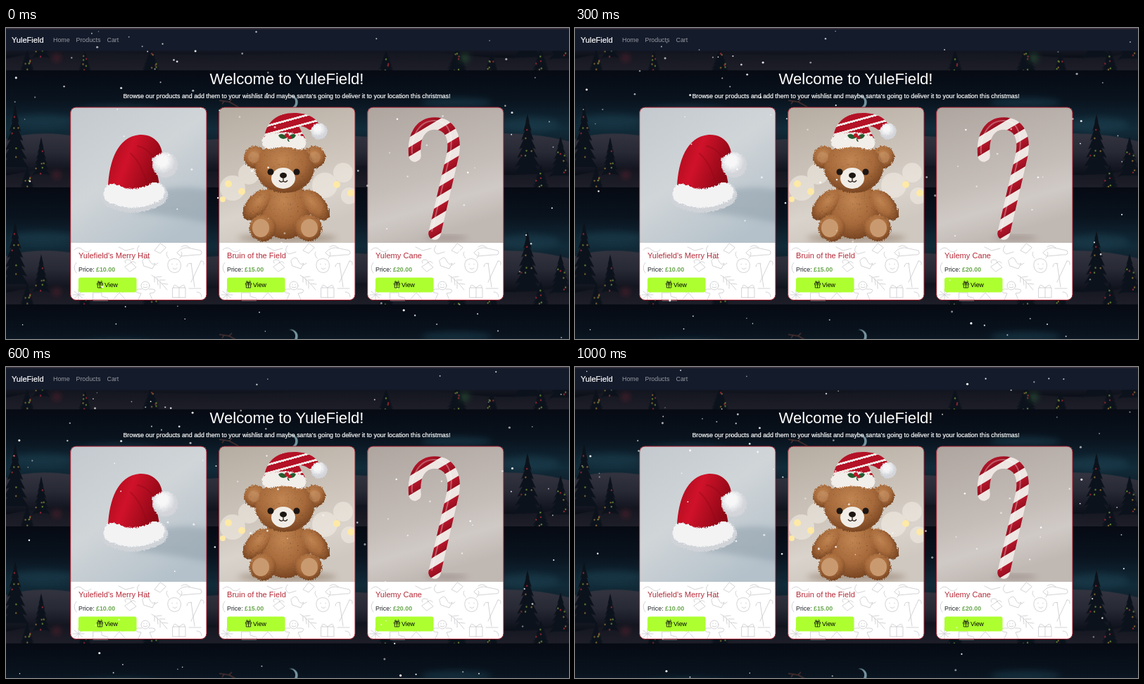
These frames come from a looping animation (800 px wide and 443 px high, 1100 ms). An HTML page with a canvas:

```html
<!DOCTYPE html>
<html lang="en">
<head>
<meta charset="utf-8">
<title>YuleField</title>
<style>
  html, body { margin: 0; width: 100%; height: 100%; overflow: hidden; background: #080d17; }
  svg, canvas { position: absolute; left: 0; top: 0; width: 800px; height: 443px; }
  text { font: 8.85px "Liberation Sans", Arial, sans-serif; fill: #212529; }
  .brand, .name { font-size: 11.1px; }
  .brand, .intro { fill: #fff; stroke: #fff; stroke-width: .2; }
  .head { font-size: 22.1px; fill: #fff; }
  .link { fill: #9699a0; }
  .name { fill: #b52b38; }
  .price { fill: #6aa84f; font-weight: bold; }
  .doodle { fill: none; stroke: #cfcfd2; stroke-width: .9; stroke-linecap: round; }
</style>
</head>
<body>
<svg viewBox="0 0 800 443">
  <defs>
    <linearGradient id="sky" x2="0" y2="1">
      <stop offset="0" stop-color="#060a13"/><stop offset=".25" stop-color="#09131e"/>
      <stop offset=".5" stop-color="#122b39"/><stop offset=".75" stop-color="#0b1420"/>
      <stop offset="1" stop-color="#090d17"/>
    </linearGradient>
    <linearGradient id="hill" x2="0" y2="1">
      <stop offset="0" stop-color="#33343f"/><stop offset=".45" stop-color="#272934"/>
      <stop offset="1" stop-color="#0a0e17"/>
    </linearGradient>
    <linearGradient id="drift" x2="0" y2="1">
      <stop offset="0" stop-color="#11141e"/><stop offset="1" stop-color="#1e1e28"/>
    </linearGradient>
    <linearGradient id="wall1" x2=".7" y2="1">
      <stop offset="0" stop-color="#c3c9ce"/><stop offset=".5" stop-color="#d0d5d8"/>
      <stop offset="1" stop-color="#b4c1ca"/>
    </linearGradient>
    <linearGradient id="wall2" x2=".3" y2="1">
      <stop offset="0" stop-color="#b5aca1"/><stop offset=".6" stop-color="#d0c8bf"/>
      <stop offset=".78" stop-color="#d9d3cc"/><stop offset="1" stop-color="#cfc8c0"/>
    </linearGradient>
    <linearGradient id="wall3" x2=".3" y2="1">
      <stop offset="0" stop-color="#aea59f"/><stop offset=".6" stop-color="#c5bdb8"/>
      <stop offset=".8" stop-color="#d0cac6"/><stop offset="1" stop-color="#c0b8b3"/>
    </linearGradient>
    <linearGradient id="red" x2="1" y2=".4">
      <stop offset="0" stop-color="#a20a19"/><stop offset=".45" stop-color="#d0122a"/>
      <stop offset="1" stop-color="#8d0715"/>
    </linearGradient>
    <radialGradient id="wool" cx=".4" cy=".35">
      <stop offset=".4" stop-color="#f7f7f8"/><stop offset="1" stop-color="#d3d5da"/>
    </radialGradient>
    <radialGradient id="fur" cx=".45" cy=".35" r=".65">
      <stop offset="0" stop-color="#c08552"/><stop offset=".6" stop-color="#a76a3b"/>
      <stop offset="1" stop-color="#784522"/>
    </radialGradient>
    <linearGradient id="candy" gradientUnits="userSpaceOnUse" x1="600" y1="140" x2="612" y2="160" spreadMethod="repeat">
      <stop offset=".48" stop-color="#eee6e2"/><stop offset=".52" stop-color="#b5162a"/>
      <stop offset=".96" stop-color="#980f20"/><stop offset="1" stop-color="#eee6e2"/>
    </linearGradient>
    <linearGradient id="stripes" gradientUnits="userSpaceOnUse" x1="390" y1="124" x2="393" y2="135" spreadMethod="repeat">
      <stop offset=".72" stop-color="#b41226"/><stop offset=".76" stop-color="#f0e6e4"/>
      <stop offset="1" stop-color="#f0e6e4"/>
    </linearGradient>
    <filter id="soft" x="-50%" y="-50%" width="200%" height="200%"><feGaussianBlur stdDeviation="4"/></filter>
    <filter id="fuzz" filterUnits="userSpaceOnUse" x="92" y="113" width="405" height="193">
      <feTurbulence baseFrequency=".3" numOctaves="2" seed="4"/>
      <feDisplacementMap in="SourceGraphic" scale="4" xChannelSelector="R" yChannelSelector="G"/>
    </filter>
    <filter id="pelt" filterUnits="userSpaceOnUse" x="303" y="113" width="194" height="193">
      <feTurbulence baseFrequency=".3" numOctaves="2" seed="4" result="noise"/>
      <feDisplacementMap in="SourceGraphic" in2="noise" scale="4" xChannelSelector="R" yChannelSelector="G" result="shape"/>
      <feColorMatrix in="noise" values="0 0 0 0 .2  0 0 0 0 .08  0 0 0 0 .02  1.8 0 0 0 -.75"/>
      <feComposite in2="shape" operator="atop"/>
    </filter>
    <clipPath id="photos">
      <path d="M92 306V121q0-8 8-8H277q8 0 8 8V306ZM303 306V121q0-8 8-8H488q8 0 8 8V306ZM514 306V121q0-8 8-8H699q8 0 8 8V306Z"/>
    </clipPath>

    <pattern id="night" patternUnits="userSpaceOnUse" y="60.3" width="800" height="166.7">
      <rect width="800" height="167" fill="url(#sky)"/>
      <g fill="#1c4353" filter="url(#soft)" opacity=".5">
        <ellipse cx="52" cy="72" rx="46" ry="9"/><ellipse cx="160" cy="58" rx="60" ry="8"/>
        <ellipse cx="745" cy="77" rx="42" ry="10"/><ellipse cx="640" cy="46" rx="50" ry="7"/>
      </g>
      <path d="M0 98Q45 84 105 95T300 98T520 95T690 90Q750 88 800 101V150H0Z" fill="url(#hill)"/>
      <path d="M0 150Q60 136 130 140T300 144T470 138T640 144T800 139V167H0Z" fill="url(#drift)"/>
      <path d="M402 36a10 10 0 1 1-4 17a9 9 0 1 0 4-17" fill="#75949f"/>
      <path d="M303 43l14 2 13 7M317 45l4-4M310 44l-3 4" fill="none" stroke="#4a302d" stroke-width="1.5"/>
      <g id="forest"></g>
    </pattern>

    <g id="card">
      <rect x="91.5" y="113" width="193.5" height="274.5" rx="8" fill="#fff"/>
      <g class="doodle">
        <path d="M97 316q6-6 12 0t12 0M160 312l10 5 12-3M189 310q-6 8 2 12l10-3M243 320q8-10 20-6l14 3q4 7-6 6l-22 2zM249 312q6-5 12 1M219 307l-8 10 8 4 8-8z"/>
        <path d="M231 328q-5-6-2-9M247 328q5-6 2-9M232 331q-5 7 1 15q7 5 13 0q5-8 0-15q-7-5-14 0M236 336v1M243 336v1M237 342q3 3 6 0"/>
        <path d="M194 331q7-8 10 0t8 4l-4 8-12-4zM169 340l9-6 7 7-9 6zM170 335q-3-5 3-5t4 5q4-5 7 0"/>
        <path d="M207 352q10 6 22 21M211 354l0 8M215 357l1 9M219 361l0 10M213 355l8-1M218 359l8 0M222 364l8 1"/>
        <path d="M263 335l5 34M277 332l-14 30M264 336q-6-3-7 4M277 332q5-1 4 5M260 371h17"/>
        <circle cx="198" cy="367" r="6"/>
        <path d="M193 372q-13-1-7 5l6 1-4 9M203 372q13-1 7 5l-6 1 4 9M196 365v1M200 365v1M195 369q3 2 6 0"/>
        <path d="M237 370h18v14h-18zM246 370v14M246 370q-9-8-8 0M246 370q9-8 8 0M97 375l12 10M109 375l-12 10M103 372v15M95 380h16"/>
        <path d="M124 377h12v5l9 3v3h-21zM153 386l8-9 8 9M158 377l4-6 4 6M271 376q7 0 7 7M100 334q-6 7 0 15M211 338l5-3"/>
      </g>
      <text x="103" y="347.2">Price:</text>
      <rect x="103" y="355.5" width="82.5" height="21" rx="3" fill="#adff2f"/>
      <path d="M129.5 363.5h8v2.2h-8zM130.3 366v4h6.4v-4M133.5 363.5v6.5M133.5 363.3q-4-.6-2.8-2.4t2.8 2.4q1.6-4.2 2.8-2.4t-2.8 2.4" fill="none" stroke="#111" stroke-width=".8"/>
      <text x="140" y="369.2" style="fill:#000">View</text>
    </g>
    <rect id="frame" x="91.7" y="113" width="193.3" height="274.5" rx="8" fill="none" stroke="#a51f2e"/>
  </defs>

  <rect width="800" height="443" fill="url(#night)"/>
  <rect width="800" height="32.5" fill="#141b2b"/>
  <rect width="800" height="1.5" fill="#3d3540"/>
  <text class="brand" x="8" y="20.5">YuleField</text>
  <text class="link" x="67" y="20">Home</text>
  <text class="link" x="99.5" y="20">Products</text>
  <text class="link" x="143.5" y="20">Cart</text>
  <text class="head" x="399" y="80" text-anchor="middle">Welcome to YuleField!</text>
  <text class="intro" x="399" y="100" text-anchor="middle">Browse our products and add them to your wishlist and maybe santa's going to deliver it to your location this christmas!</text>

  <use href="#card"/><use href="#card" x="211"/><use href="#card" x="422"/>

  <g clip-path="url(#photos)">
    <!-- cap -->
    <rect x="91" y="113" width="195" height="193" fill="url(#wall1)"/>
    <path d="M180 262Q215 264 290 278V232Q250 222 215 232Z" fill="#8b9ba7" opacity=".5" filter="url(#soft)"/>
    <path d="M145 225C147 190 158 155 190 152C212 151 223 168 222 183L207 185C213 198 216 210 218 224Q180 246 145 225" fill="url(#red)"/>
    <path d="M186 168q14 2 23 16M176 178q15 12 24 42" fill="none" stroke="#8d0916" stroke-width="2" opacity=".4"/>
    <g filter="url(#fuzz)">
      <path d="M151 238Q180 253 212 236" fill="none" stroke="#d0d4d9" stroke-width="34" stroke-linecap="round"/>
      <path d="M151 235Q180 249 211 233" fill="none" stroke="#f3f3f4" stroke-width="27" stroke-linecap="round"/>
      <circle cx="225" cy="194" r="18" fill="url(#wool)"/>
    </g>

    <!-- bear -->
    <rect x="302" y="113" width="195" height="193" fill="url(#wall2)"/>
    <g fill="#f4eee5" opacity=".55">
      <circle cx="322" cy="228" r="18"/><circle cx="345" cy="208" r="15"/><circle cx="453" cy="224" r="18"/>
      <circle cx="479" cy="206" r="14"/><circle cx="488" cy="239" r="12"/>
    </g>
    <g fill="#ffe9a6">
      <circle cx="316" cy="222" r="5"/><circle cx="335" cy="233" r="5"/><circle cx="470" cy="223" r="5"/>
      <circle cx="490" cy="235" r="5"/><circle cx="308" cy="244" r="4"/>
    </g>
    <ellipse cx="400" cy="299" rx="70" ry="6" fill="#8d7763" opacity=".6" filter="url(#soft)"/>
    <g fill="url(#fur)" filter="url(#pelt)">
      <circle cx="353" cy="183" r="16"/><circle cx="437" cy="183" r="16"/>
      <ellipse cx="396" cy="258" rx="36" ry="42"/>
      <ellipse cx="355" cy="251" rx="14" ry="26" transform="rotate(40 355 251)"/>
      <ellipse cx="439" cy="251" rx="14" ry="26" transform="rotate(-40 439 251)"/>
      <ellipse cx="395" cy="198" rx="42" ry="36"/>
      <circle cx="364" cy="284" r="19"/><circle cx="429" cy="284" r="19"/>
    </g>
    <g fill="#c99a70">
      <ellipse cx="362" cy="285" rx="12" ry="13"/><ellipse cx="431" cy="285" rx="12" ry="13"/>
      <circle cx="352" cy="184" r="8" opacity=".4"/><circle cx="439" cy="184" r="8" opacity=".4"/>
    </g>
    <ellipse cx="394" cy="214" rx="17" ry="15" fill="#f1ede6"/>
    <g fill="#1c1512"><circle cx="376" cy="205" r="4.5"/><circle cx="413" cy="205" r="4.5"/><ellipse cx="394" cy="210" rx="5" ry="4"/></g>
    <path d="M394 213v5M388 217q3 4 6 1q3 3 6-1" fill="none" stroke="#30231d" stroke-width="1.3"/>
    <path d="M367 156C370 132 387 121 409 121C432 121 443 130 447 142L434 148Q426 139 416 140L425 157Z" fill="url(#stripes)"/>
    <g filter="url(#fuzz)">
      <path d="M373 161Q395 154 415 162" fill="none" stroke="#f2eeea" stroke-width="21" stroke-linecap="round"/>
      <circle cx="444" cy="146" r="11.5" fill="url(#wool)"/>
    </g>
    <path d="M400 156q-8-8-13-3q4 8 13 3q8-8 12-3q-4 8-12 3q-1 6 3 6" fill="#245b2f"/>
    <g fill="#bd1628"><circle cx="399" cy="153" r="3"/><circle cx="403" cy="156" r="2.5"/></g>

    <!-- cane -->
    <rect x="513" y="113" width="195" height="193" fill="url(#wall3)"/>
    <ellipse cx="626" cy="299" rx="30" ry="3" fill="#85736d" opacity=".6" filter="url(#soft)"/>
    <path d="M581 182C578 153 590 136 609 136C632 136 639 157 635 180L609 293" fill="none" stroke="url(#candy)" stroke-width="17.5" stroke-linecap="round"/>
    <path d="M577 179C575 153 588 132 609 132C630 132 636 154 631 180L605 290" fill="none" stroke="#fff" stroke-width="2" opacity=".3"/>
  </g>

  <use href="#frame"/><use href="#frame" x="211"/><use href="#frame" x="422"/>
  <text class="name" x="103" y="328">Yulefield's Merry Hat</text>
  <text class="name" x="314" y="328">Bruin of the Field</text>
  <text class="name" x="525" y="328">Yulemy Cane</text>
  <text class="price" x="128" y="347.2">£10.00</text>
  <text class="price" x="339" y="347.2">£15.00</text>
  <text class="price" x="550" y="347.2">£20.00</text>
</svg>
<canvas width="800" height="443"></canvas>
<script>
const LOOP = 1100, STEP = 100, TOP = 3, HEIGHT = 440;

function seeded(seed) {
  return () => (seed = (seed * 16807) % 2147483647) / 2147483647;
}

// A fir of stacked tiers, hung with coloured lights
const treeRandom = seeded(71);
function tree(x, top, base, width) {
  const tiers = 7, left = [], right = [];
  for (let i = 1; i <= tiers; i++) {
    const y = top + (base - top) * i / tiers, half = width * i / tiers / 2;
    left.push(`${x - half} ${y}`, `${x - half * .6} ${y - 2}`);
    right.unshift(`${x + half * .6} ${y - 2}`, `${x + half} ${y}`);
  }
  let art = `<path d="M${x} ${top}L${left.join("L")}L${right.join("L")}Z" fill="#0c121b"/>`;
  for (let i = 0; i < 6; i++) {
    const depth = .2 + .75 * treeRandom();
    const cx = x + (treeRandom() - .5) * width * depth * .8;
    const color = ["#8f2530", "#5f7d33", "#7d6433"][i % 3];
    art += `<circle cx="${cx}" cy="${top + depth * (base - top)}" r="1.2" fill="${color}"/>`;
  }
  return art;
}

document.getElementById("forest").innerHTML = [
  [13, 48, 140, 40], [50, 95, 150, 26], [741, 62, 150, 42], [788, 94, 152, 34],
  [30, 137, 170, 24], [112, 139, 170, 22], [206, 134, 170, 30], [540, 138, 170, 26],
  [641, 132, 170, 34], [690, 140, 170, 22], [760, 134, 170, 28]
].map(spec => tree(...spec)).join("") +
  '<g filter="url(#soft)" opacity=".5"><circle cx="652" cy="149" r="6" fill="#31733b"/><circle cx="72" cy="149" r="5" fill="#8b2732"/></g>';

const random = seeded(2024);
const flakes = Array.from({ length: 90 }, () => ({
  x: random() * 800, y: random() * HEIGHT,
  drift: (random() - .5) * 16, fall: 20 + random() * 50,
  size: .7 + random() * .9, alpha: .4 + random() * .6
}));

const ctx = document.querySelector("canvas").getContext("2d");
ctx.fillStyle = "#fff";

function draw() {
  const seconds = Math.floor(performance.now() % LOOP / STEP) * STEP / 1000;
  ctx.clearRect(0, 0, 800, 443);
  for (const f of flakes) {
    ctx.globalAlpha = f.alpha;
    ctx.beginPath();
    ctx.arc(f.x + f.drift * seconds, TOP + (f.y + f.fall * seconds) % HEIGHT, f.size, 0, Math.PI * 2);
    ctx.fill();
  }
  requestAnimationFrame(draw);
}
draw();
</script>
</body>
</html>
```
